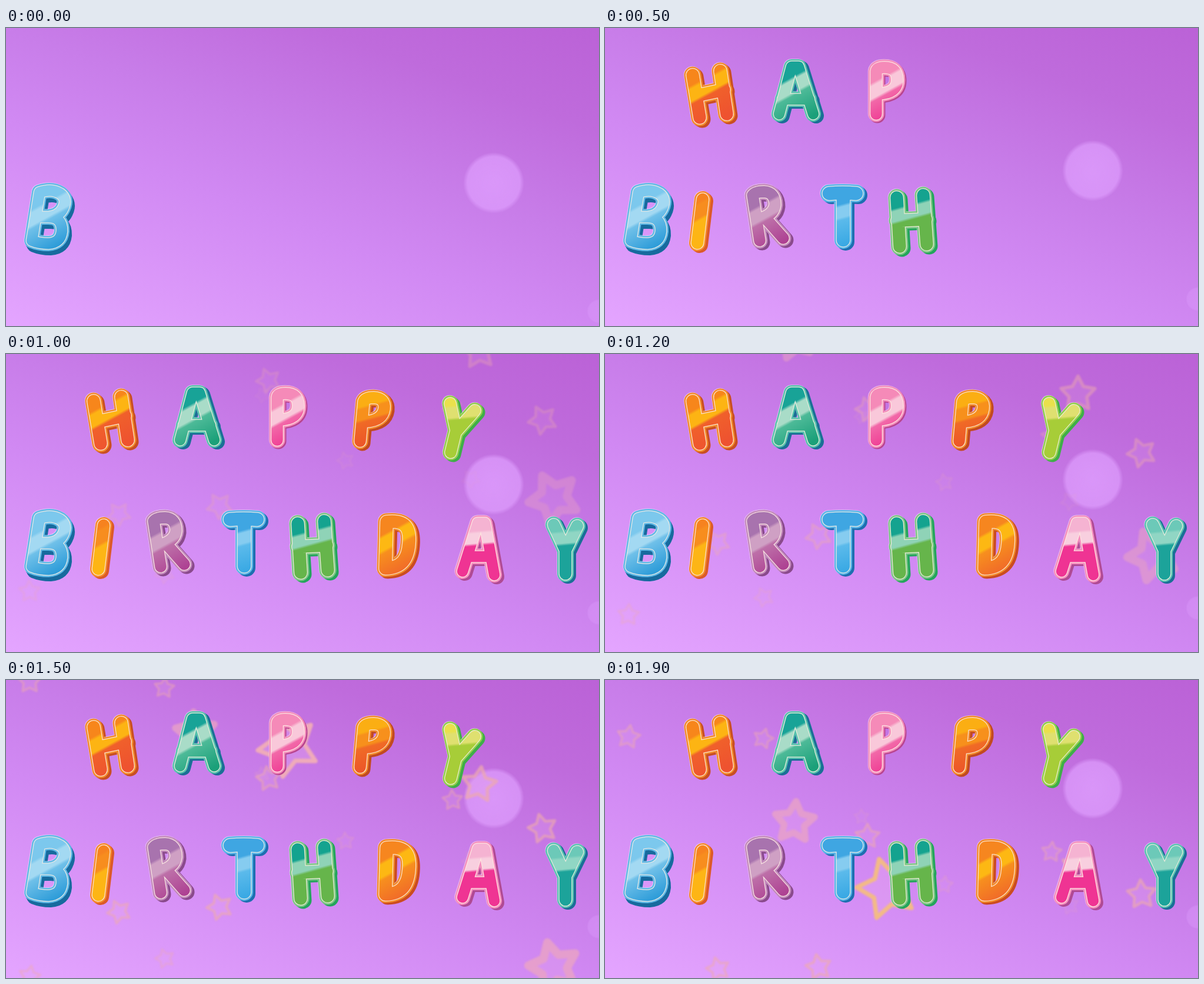
These frames come from a looping animation (1008 px wide and 506 px high, 2000 ms). An HTML page:

```html
<!DOCTYPE html>
<html lang="en">
<head>
<meta charset="utf-8">
<title>Happy Birthday</title>
<style>
html, body { margin: 0; width: 100%; height: 100%; overflow: hidden; }
#stage {
  position: relative; width: 1008px; height: 506px; overflow: hidden;
  background: linear-gradient(20deg, #e4a5ff, #d189f3 40%, #c87de9 58%, #bf6bdc 80%, #bb62d7);
}
svg { position: absolute; left: 0; top: 0; display: block; }
#wipe {
  position: absolute; left: 0; top: 0; height: 506px; overflow: hidden;
  animation: wipe 2s steps(20) infinite;
}
#stars { filter: blur(1.5px); }
.orb { animation: drift 2s steps(20) infinite; }
.star {
  stroke: #eeaaae; stroke-width: .17; stroke-linejoin: round;
  fill: #eeb0ea; fill-opacity: .3;
  animation: fall 2s steps(20) infinite, appear 2s infinite;
}
.solid { stroke: #eca6c0; stroke-width: .3; }
.gold {
  stroke-width: .13;
  animation: fall 2s steps(20) infinite, appear 2s infinite, gild 2s infinite;
}
@keyframes wipe { from { width: 123px; } to { width: 1898px; } }
@keyframes drift { to { transform: translateY(-83px); } }
@keyframes fall {
  from { transform: translate(var(--x), var(--y)) rotate(var(--a)) scale(var(--r)); }
  to { transform: translate(var(--x), calc(var(--y) + var(--v))) rotate(calc(var(--a) + 50deg)) scale(var(--r)); }
}
@keyframes appear {
  0% { opacity: 0; }
  25% { opacity: 0; animation-timing-function: steps(10); }
  75%, 100% { opacity: var(--o); }
}
@keyframes gild {
  0% { stroke: #f2aeb6; }
  75% { stroke: #f2aeb6; animation-timing-function: steps(2); }
  85%, 100% { stroke: #f5bd80; }
}
</style>
</head>
<body>
<div id="stage">
  <svg width="1008" height="506">
    <defs>
      <radialGradient id="glow">
        <stop offset="0" stop-color="#dd9cfc" stop-opacity=".85"/>
        <stop offset=".86" stop-color="#dd9cfc" stop-opacity=".75"/>
        <stop offset="1" stop-color="#dd9cfc" stop-opacity="0"/>
      </radialGradient>
    </defs>
    <circle class="orb" cx="829" cy="263" r="52" fill="url(#glow)"/>
    <circle class="orb" cx="1008" cy="481" r="21" fill="url(#glow)" opacity=".5"/>
    <g id="stars"></g>
  </svg>
  <div id="wipe"><svg id="letters" width="1008" height="506" role="img" aria-label="Happy Birthday"></svg></div>
</div>
<script>
const NS = 'http://www.w3.org/2000/svg';

function add(parent, tag, attrs) {
  const el = document.createElementNS(NS, tag);
  for (const key in attrs) el.setAttribute(key, attrs[key]);
  return parent.appendChild(el);
}

// Falling stars: x, start y, fall per loop, radius, start angle, peak opacity, style
const stars = [
  [931, -240, 970, 47, 20, .75, 'solid'],
  [192, 29, 486, 22, 10, .65],
  [363, 3, 510, 24, 14, .7],
  [912, -168, 560, 27, 20, .7],
  [759, -126, 440, 19, 30, .55],
  [804, -370, 730, 33, 42, .75],
  [446, -200, 490, 23, 25, .6],
  [322, -481, 760, 38, 29, .7, 'solid'],
  [480, -795, 1210, 57, 9, .95, 'gold'],
  [269, -309, 430, 19, 40, .55],
  [40, -350, 470, 22, 34, .55],
  [270, 173, 400, 18, 18, .4],
  [40, 203, 400, 20, 45, .5],
  [577, -4, 370, 16, 30, .3],
  [790, 22, 380, 17, 12, .18],
  [436, -110, 360, 14, 22, .2]
];

const points = Array.from({ length: 10 }, (_, i) => {
  const r = i % 2 ? .48 : .92, a = (i / 5 - .5) * Math.PI;
  return (r * Math.cos(a)).toFixed(3) + ',' + (r * Math.sin(a)).toFixed(3);
}).join(' ');

const sky = document.getElementById('stars');
for (const [x, y, v, r, a, o, kind = ''] of stars) {
  add(sky, 'polygon', {
    points, class: 'star ' + kind,
    style: `--x:${x}px;--y:${y}px;--v:${v}px;--r:${r};--a:${a}deg;--o:${o}`
  });
}

// Bubble letters: a stroked skeleton, [top, band, bottom, end] fill, rim, shadow, band slope
const letters = [
  { x: 179, w: 29, d: 'M149 80L161 152M196 73L207 146M155 115L202 105',
    fill: ['#f7861b', '#fdb413', '#f0602b', '#ee5230'], rim: '#f28a2a', shade: '#c94f22' },
  { x: 324, w: 26, d: 'M296 146L317 66H329L354 146M302 121H347',
    fill: ['#18a397', '#a9dcc8', '#4dba98', '#1ba079'], rim: '#55c3ac', shade: '#1b6f96', dx: 5 },
  { x: 478, w: 27, d: 'M461 146L461 74Q462 67 475 67Q497 67 497 88Q497 111 464 112',
    fill: ['#f58ab8', '#f9c8da', '#f268a8', '#ee2f8e'], rim: '#f48fbd', shade: '#b9458f', dx: 2, dy: 2 },
  { x: 622, w: 27, d: 'M602 148L608 81Q611 74 625 74Q645 75 643 93Q640 113 612 115',
    fill: ['#fbae13', '#f7901c', '#f06a26', '#ec5429'], rim: '#f28a2a', shade: '#c24a20', slope: .3 },
  { x: 774, w: 27, d: 'M755 84L765 130L756 167M797 96L765 132',
    fill: ['#e9e14c', '#dfe070', '#a7cd38'], rim: '#8fd04a', shade: '#3fae49', slope: .1 },
  { x: 70, w: 26, d: 'M57 279L44 361Q56 366 72 366Q93 365 95 345Q96 321 72 321H52M57 279Q78 272 92 281Q105 290 97 306Q91 319 72 321',
    fill: ['#7cc8ed', '#a3d9f2', '#6fc0e9', '#2f9dd9'], rim: '#5fb9e6', shade: '#176a9e', dy: 7 },
  { x: 162, w: 28, d: 'M166 291L157 365',
    fill: ['#f6821f', '#f78d1e', '#fdb515'], rim: '#f58a2a', shade: '#dc5a28' },
  { x: 275, w: 27, d: 'M263 361L251 284Q256 278 270 278Q289 279 289 300Q287 319 258 325M272 322L303 357',
    fill: ['#a873ae', '#cfa0c4', '#bd6fa8', '#ae4293'], rim: '#c48abd', shade: '#8a4a8c' },
  { x: 404, w: 30, d: 'M381 281Q404 279 427 281M405 285L405 360',
    fill: ['#3fa6e2', '#86ccf0', '#5bbaeb', '#3aa9e4'], rim: '#58b6e8', shade: '#1d6fb0', slope: .3 },
  { x: 521, w: 29, d: 'M496 288L501 371M541 284L547 367M497 327L545 325',
    fill: ['#14a38f', '#8fd3b7', '#66b54b'], rim: '#7ac684', shade: '#24a55c', slope: .3 },
  { x: 664, w: 29, d: 'M647 285C682 281 687 298 685 322C683 350 671 363 645 364Z',
    fill: ['#f6861f', '#fdb813', '#f78f1e', '#f0672a'], rim: '#f28a2a', shade: '#cb4c20' },
  { x: 804, w: 26, d: 'M776 369L802 287H814L830 375M785 344H824',
    fill: ['#f5b3d2', '#f8cfdf', '#ef3493'], rim: '#f58fbf', shade: '#b04a94', slope: .1 },
  { x: 951, w: 28, d: 'M931 290L951 333L951 373M971 292L951 333',
    fill: ['#6cc9b8', '#90d6c4', '#1ca39a'], rim: '#58c4b2', shade: '#1b6f96', slope: .1 }
];

const sheet = document.getElementById('letters');
letters.forEach(({ x, w, d, fill: [top, band, bottom, end = bottom], rim, shade, dx = 4, dy = 3, slope = .6 }, i) => {
  const y = i < 5 ? 52 : 266, tilt = slope * 50;
  const grad = add(sheet, 'linearGradient', {
    id: 'ink' + i, gradientUnits: 'userSpaceOnUse', x1: x - tilt, y1: y, x2: x + tilt, y2: y + 110
  });
  [[.31, top], [.35, band], [.5, band], [.54, bottom], [.9, end]].forEach(([offset, color]) =>
    add(grad, 'stop', { offset, 'stop-color': color }));

  const g = add(sheet, 'g', { fill: 'none', 'stroke-linecap': 'round', 'stroke-linejoin': 'round' });
  const layer = (stroke, width, sx = 0, sy = 0, opacity = 1) => add(g, 'path', {
    d, stroke, 'stroke-width': width, opacity, transform: `translate(${sx} ${sy})`
  });
  layer(shade, w, dx, dy);
  layer(shade, w, dx / 2, dy / 2);
  layer('#fff', w, -.7, -.7, .5);
  layer(rim, w);
  layer('#fff3e6', w - 5, 0, 0, .85);
  layer(`url(#ink${i})`, w - 7.5);
});
</script>
</body>
</html>
```
